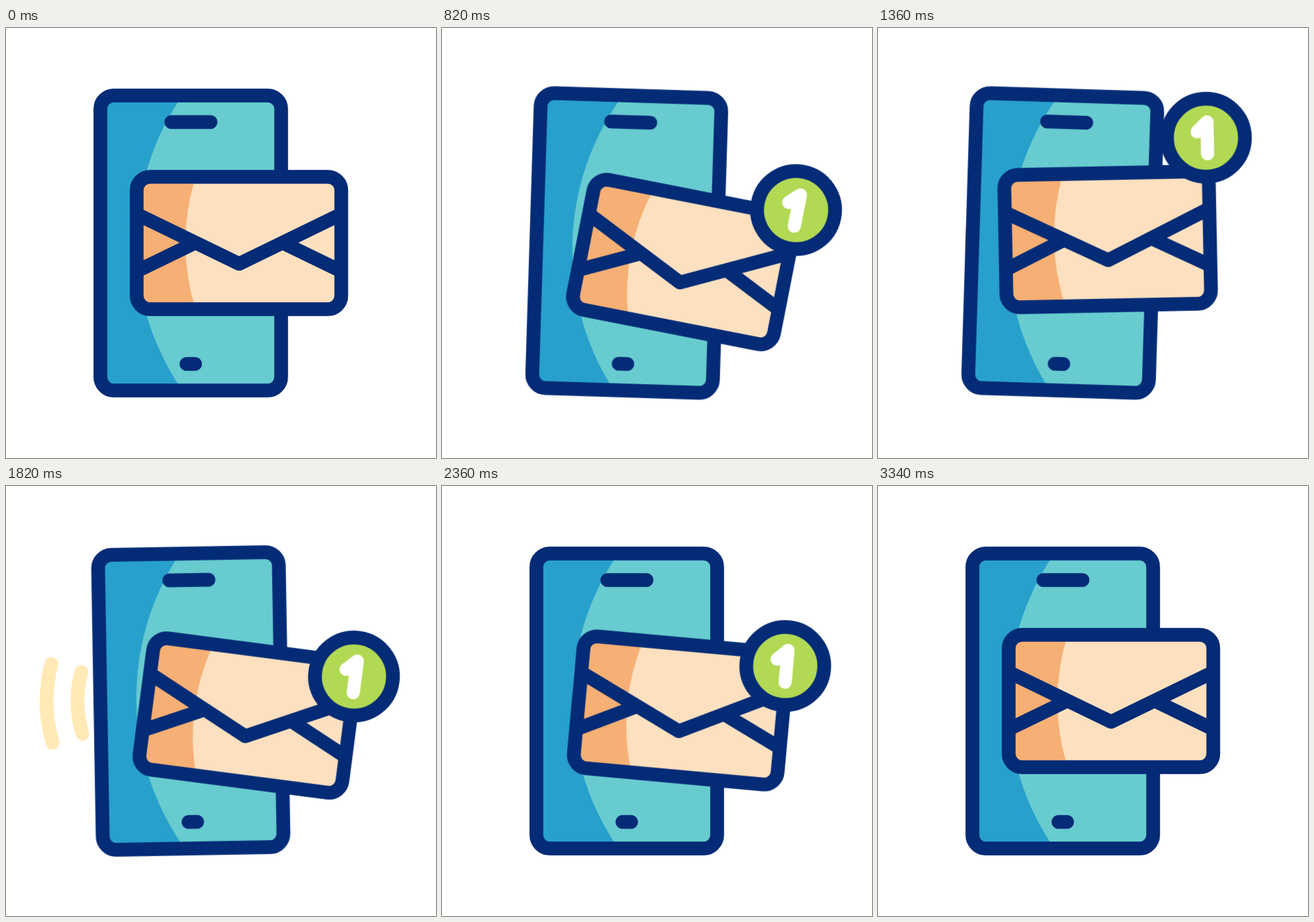
These frames come from a looping animation (640 by 640 pixels, 3600 ms). An HTML page without scripts:

```html
<!DOCTYPE html>
<html lang="en">
<head>
<meta charset="utf-8">
<title>New message</title>
<style>
  html, body { margin: 0; width: 100%; height: 100%; overflow: hidden; background: #fff; }
  svg { display: block; width: 640px; height: 640px; }

  .line { fill: none; stroke: #032b76; stroke-width: 20.5; stroke-linejoin: round; }
  .round { stroke-linecap: round; }
  .waves { stroke: #ffd166; }
  .digit { stroke: #fff; stroke-width: 19.5; }
  .fixed { vector-effect: non-scaling-stroke; }

  .phone, .waves, .envelope, .hop, .pop { animation: 3600ms linear infinite; }
  .phone { transform-origin: 275px 320px; animation-name: shake; animation-timing-function: ease-in-out; }
  .waves { animation-name: ripple; }
  .envelope { transform-origin: 196px 418px; animation-name: tilt; animation-timing-function: ease-in-out; }
  .hop { animation-name: hop; }
  .pop { animation-name: pop; animation-timing-function: ease-in-out; }

  @keyframes shake {
    0%, 60.56%, 100% { transform: rotate(0deg); }
    4.17%, 11.7%, 19.22%, 26.75%, 34.28%, 41.81%, 49.34%, 56.86% { transform: rotate(-1.8deg); }
    7.93%, 15.46%, 22.99%, 30.52%, 38.04%, 45.57%, 53.1% { transform: rotate(1.8deg); }
  }

  @keyframes ripple {
    0%, 2.49% { transform: translateX(75px); opacity: 0; }
    2.5%, 37.78% { transform: translateX(67px); opacity: 1; }
    9.72%, 45% { transform: translateX(16px); }
    13.6%, 48.9% { opacity: 1; }
    16.94%, 52.22% { transform: translateX(-21px); opacity: 0; }
    16.95%, 37.77%, 52.23%, 100% { transform: translateX(75px); opacity: 0; }
  }

  @keyframes tilt {
    0%, 4% { transform: rotate(0deg); }
    12.78% { transform: rotate(9.3deg); }
    22.78% { transform: rotate(9.3deg); }
    30.8% { transform: rotate(10deg); }
    37.78% { transform: rotate(-2.9deg); }
    44% { transform: rotate(-1deg); animation-timing-function: ease-out; }
    47.8% { transform: rotate(11.5deg); }
    50.56% { transform: rotate(8.4deg); }
    60% { transform: rotate(5.7deg); }
    65.56% { transform: rotate(5.2deg); animation-timing-function: ease-in; }
    75.56% { transform: rotate(4deg); animation-timing-function: ease-out; }
    92%, 100% { transform: rotate(0deg); }
  }

  @keyframes hop {
    0%, 12.78% { transform: translateY(-25px); }
    22.78%, 31% { transform: translateY(-28px); animation-timing-function: ease-out; }
    37.78% { transform: translateY(-68px); animation-timing-function: ease-out; }
    40% { transform: translateY(-88px); animation-timing-function: ease-in; }
    47.2% { transform: translateY(-4px); }
    50.56% { transform: translateY(2px); }
    60%, 100% { transform: translateY(0); }
  }

  @keyframes pop {
    0%, 4% { transform: scale(0); visibility: hidden; }
    4.2% { visibility: visible; }
    12.78% { transform: scale(1.18); }
    20.5%, 86% { transform: scale(1); }
    92% { visibility: visible; }
    92.3%, 100% { transform: scale(0); visibility: hidden; }
  }
</style>
</head>
<body>
<svg viewBox="0 0 640 640">
  <g class="phone">
    <g class="waves line round">
      <path d="M81 261.5Q65 320 81 378.5"/>
      <path d="M125.5 274Q112.5 320 125.5 366"/>
    </g>

    <rect x="140.5" y="100.5" width="269" height="439" rx="20" fill="#67cbd0"/>
    <path d="M146 104H260A387 387 0 0 0 260 536H146Z" fill="#28a0cc"/>
    <rect class="line" x="140.5" y="100.5" width="269" height="439" rx="20"/>
    <path class="line round" d="M246 140H304.5M268.5 500H281.5"/>

    <g class="envelope">
      <rect x="194.5" y="221.5" width="304.5" height="197" rx="20" fill="#fde0bf"/>
      <path d="M200 225H281A329 329 0 0 0 281 415H200Z" fill="#f6af74"/>
      <path class="line" d="M194.5 277L347 351L499 277M194.5 362L281 320M499 362L412.5 320"/>
      <rect class="line" x="194.5" y="221.5" width="304.5" height="197" rx="20"/>

      <g transform="translate(496 240)">
        <g class="hop">
          <g class="pop">
            <circle class="line fixed" r="58" style="fill:#b2d953"/>
            <path class="line round digit fixed" d="M-13 -9L2 -23.5V24"/>
          </g>
        </g>
      </g>
    </g>
  </g>
</svg>
</body>
</html>
```
